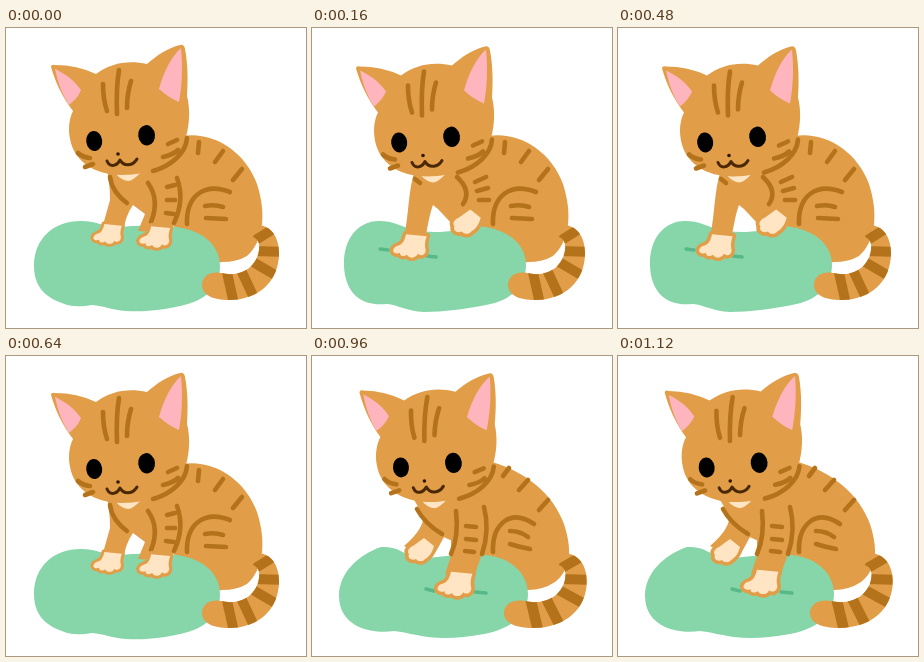
An HTML page for the animation above (1280 ms loop, 300 by 300 pixels).

```html
<!DOCTYPE html>
<html lang="en">
<head>
<meta charset="utf-8">
<title>Kneading kitten</title>
<style>
html, body { margin: 0; width: 100%; height: 100%; overflow: hidden; background: #fff; }
svg { display: block; width: 100vw; height: 100vh; }
.fur { fill: #e19d47; }
.mark { fill: none; stroke: #b4731b; stroke-width: 4.6; stroke-linecap: round; stroke-linejoin: round; }
.pink { fill: #ffb5bd; }
.cream { fill: #ffe5c3; }
.paw { fill: #ffe5c3; stroke: #e19d47; stroke-width: 7; paint-order: stroke; stroke-linejoin: round; }
.pillow { fill: #87d6a9; }
.crease { fill: none; stroke: #57b88a; stroke-width: 3.5; stroke-linecap: round; }
.mouth { fill: none; stroke: #4a2806; stroke-width: 3; stroke-linecap: round; stroke-linejoin: round; }
</style>
</head>
<body>
<svg viewBox="0 0 300 300">
  <defs>
    <clipPath id="tailClip"><path id="tailShape" d="M251 197 C265 197 273 209 273 225 C273 253 253 272 223 272 C207 272 196 267 196 257 C196 247 206 243 215 245 C236 250 251 238 253 222 C254 215 252 211 247 209Z"/></clipPath>
  </defs>

  <path id="body" class="fur"/>
  <path id="bodyMarks" class="mark"/>
  <path id="pillow" class="pillow"/>
  <path id="crease" class="crease"/>
  <path id="legs" class="fur"/>
  <path id="legMarks" class="mark"/>
  <path id="leftPaw" class="paw"/>
  <path id="rightPaw" class="paw"/>

  <g id="tail">
    <use href="#tailShape" class="fur"/>
    <path clip-path="url(#tailClip)" fill="none" stroke="#b4731b" stroke-width="10" d="M248 213 L272 198 M248 223 L278 224 M247 234 L276 251 M235 242 L249 272 M220 240 L228 276"/>
  </g>

  <g id="head">
    <path class="cream" d="M110 146 L135 144 Q127 153 122 153 Q115 152 110 146Z"/>
    <path class="fur" d="M45 39 Q45 36 49 37 Q71 37 90 46 C105 35 122 32 141 36 C151 27 162 20 174 17 Q178 16 179 21 C182 37 182 53 181 68 C184 80 184 94 180 109 C171 135 145 147 116 147 C88 147 68 133 64 111 C62 101 63 91 67 83 C57 70 50 56 45 39Z"/>
    <path class="pink" d="M49 41 C60 46 69 53 75 62 Q72 70 63 77 C56 66 52 55 49 41Z M175 20 C177 40 176 58 173 74 Q163 70 153 61 C158 43 165 29 175 20Z"/>
    <path class="mark" d="M97 56 Q97 71 101 83 M113 42 Q110 60 111 86 M125 53 Q121 66 121 80 M162 116 L171 112 M157 129 Q167 127 172 122 M181 110 C180 125 165 138 147 143 M72 125 Q76 129 84 130 M79 139 L87 136"/>
    <ellipse cx="88.2" cy="113" rx="8" ry="10" transform="rotate(-7 88.2 113)"/>
    <ellipse cx="140.6" cy="107.3" rx="8.4" ry="10.2" transform="rotate(-7 140.6 107.3)"/>
    <circle cx="112" cy="126" r="1.8" fill="#321600"/>
    <path class="mouth" d="M101 133 C104 140 111 138 114 132 C118 139 127 138 131 131"/>
  </g>
</svg>
<script>
const planted = 'M-2 -12 L19 -10 C17 -4 17 0 18 4 C18 9 13 11 10 8 C8 13 1 13 -1 9 C-6 12 -9 9 -8 7 C-14 9 -17 5 -14 2 C-11 -2 -5 2 -2 -12Z';
const lifted = 'M5 -11 L15 -3 C13 4 10 8 6 10 C4 13 -1 13 -3 10 C-7 12 -12 9 -10 5 C-13 2 -9 -2 -6 -3Z';

// Paws and tail: x, y, scale. Head: x, y, turn.
const rest = {
  body: 'M112 142 L176 108 C207 103 239 123 251 156 C261 187 257 214 241 228 Q231 234 216 234 L185 240 L168 198 L130 178 L113 160Z',
  bodyMarks: 'M193 114 L192 125 M217 123 L209 134 M236 141 L227 152 M181 196 C180 168 198 154 224 164 M199 178 Q209 176 217 179 M200 190 L220 191',
  pillow: 'M28 238 C28 211 47 193 75 193 C90 193 95 197 108 200 C130 197 152 197 171 199 C198 203 214 218 214 238 C214 258 202 270 182 276 C160 282 140 284 120 283 C106 282 98 278 86 277 C75 279 64 279 56 275 C38 269 28 257 28 238Z',
  crease: '',
  legs: 'M101 142 Q104 156 104 172 L97 197 L118 200 C119 192 122 184 127 177 L139 186 L132 203 L164 205 C169 192 176 180 175 160 L140 142Z',
  legMarks: 'M104 149 Q106 164 121 175 M142 155 Q154 172 145 194 M171 150 Q179 172 168 195 M161 159 L169 157 M161 172 L169 172 M160 185 L168 186',
  leftShape: planted, leftPaw: [100, 206, .83],
  rightShape: planted, rightPaw: [147, 209, .9],
  head: [0, 0, 0], tail: [0, 0, 1]
};

const pressLeft = {
  ...rest,
  pillow: 'M32 238 C31 212 45 193 67 193 C82 193 88 198 99 201 C122 207 143 203 168 198 C198 202 214 217 214 237 C214 258 199 273 174 277 C153 281 132 284 112 284 C94 283 86 277 75 276 C46 279 33 262 32 238Z',
  crease: 'M68 221 L76 222 M115 228 L124 229',
  legs: 'M103 142 C96 162 97 187 92 209 L113 212 C116 196 118 185 121 177 C128 182 133 189 140 196 L165 198 C175 184 180 169 177 148 L140 142Z',
  legMarks: 'M145 149 Q160 163 151 176 M163 154 L174 149 M165 163 L176 160 M167 172 L177 172 M103 151 L108 155',
  leftPaw: [96, 218, .98],
  rightShape: lifted, rightPaw: [153, 193, 1.05],
  head: [-1, 1.5, 0]
};

const pressRight = {
  body: 'M113 142 L180 106 C214 116 241 138 252 168 C261 196 258 214 243 226 Q231 234 216 234 L185 240 L168 198 L132 181 L113 162Z',
  bodyMarks: 'M197 112 L191 120 M216 124 L207 134 M236 144 L227 154 M181 196 C180 168 198 152 222 168 M198 175 Q208 175 216 181 M198 188 Q207 191 218 193',
  pillow: 'M27 240 C27 217 46 199 69 191 C83 190 92 196 102 203 C122 202 148 197 174 199 C200 202 216 218 216 238 C216 259 199 273 172 278 C150 282 132 283 116 281 C102 279 92 276 82 275 C70 277 56 275 47 271 C34 265 27 254 27 240Z',
  crease: 'M114 233 L122 235 M163 236 L174 237',
  legs: 'M101 142 L111 159 Q113 172 92 190 L118 203 C124 197 128 188 132 181 L139 184 L139 200 L133 218 L163 220 C166 205 176 190 178 165 L165 140Z',
  legMarks: 'M105 153 Q113 168 130 178 M144 155 Q147 180 139 198 M172 151 Q178 174 170 198 M154 170 L164 171 M154 183 L164 184 M153 195 L162 196',
  leftShape: lifted, leftPaw: [107, 194, 1],
  rightShape: planted, rightPaw: [141, 226, 1.02],
  head: [.5, -1, 1], tail: [-18.7, 0, 1.075]
};

const deepLeft = { ...pressLeft, leftPaw: [96, 220, .98], rightPaw: [153, 192, 1.05], head: [-1.5, 2, -.3], tail: [.7, 0, 1] };
const deepRight = { ...pressRight, leftPaw: [107, 193, 1], rightPaw: [141, 228, 1.02], head: [.8, -1, 1.3] };
const steps = [rest, pressLeft, deepLeft, pressLeft, rest, pressRight, deepRight, pressRight];

const el = id => document.getElementById(id);
const setPath = (id, d) => el(id).setAttribute('d', d);
const setTransform = (id, value) => el(id).setAttribute('transform', value);

function show(pose) {
  for (const id of ['body', 'bodyMarks', 'pillow', 'crease', 'legs', 'legMarks']) setPath(id, pose[id]);
  setPath('leftPaw', pose.leftShape);
  setPath('rightPaw', pose.rightShape);
  for (const id of ['leftPaw', 'rightPaw']) {
    const [x, y, size] = pose[id];
    setTransform(id, `translate(${x} ${y}) scale(${size})`);
  }
  const [tailX, tailY, stretch] = pose.tail;
  setTransform('tail', `translate(${tailX} ${tailY}) scale(${stretch} 1)`);
  const [x, y, turn] = pose.head;
  setTransform('head', `translate(${x} ${y}) rotate(${turn} 114 110)`);
}

const start = performance.now();
let current;
function tick() {
  const pose = steps[Math.floor((performance.now() - start) / 160) % steps.length];
  if (pose !== current) show(current = pose);
  requestAnimationFrame(tick);
}
tick();
</script>
</body>
</html>
```
